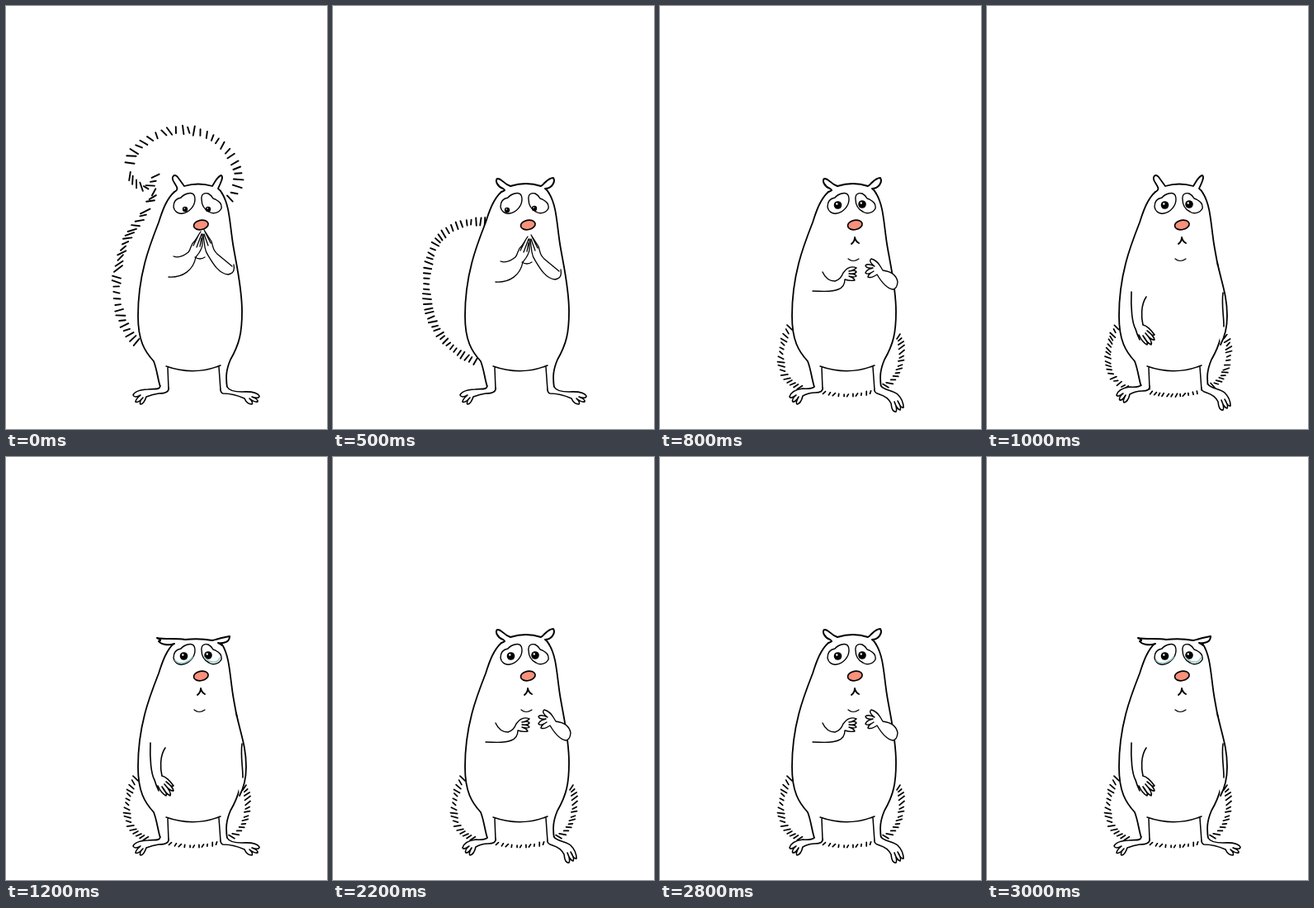
These frames come from a looping animation (389 px wide and 512 px high, 8 s). An HTML page:

```html
<!DOCTYPE html>
<html lang="en">
<head>
<meta charset="utf-8">
<title>Worried squirrel</title>
<style>
html, body { margin: 0; width: 100%; height: 100%; overflow: hidden; background: #fff; }
svg { display: block; width: 100%; height: 100%; }
svg * { stroke-linecap: round; stroke-linejoin: round; }
.pose { visibility: hidden; animation: 8s step-end infinite; }
.shy { animation-name: shy; }
.peek { animation-name: peek; }
.hide { animation-name: hide; }
.fidget { animation-name: fidget; }
.start { animation-name: start; }
.settle { animation-name: settle; }
.sad { animation-name: sad; }
@keyframes shy { 0% { visibility: visible } 6.25%, 100% { visibility: hidden } }
@keyframes peek { 0% { visibility: hidden } 6.25% { visibility: visible } 8.75%, 100% { visibility: hidden } }
@keyframes hide { 0%, 10%, 35%, 100% { visibility: hidden } 8.75%, 28.75% { visibility: visible } }
@keyframes fidget { 0%, 12.5%, 28.75%, 36.25%, 100% { visibility: hidden } 10%, 27.5%, 35% { visibility: visible } }
@keyframes start { 0%, 15%, 100% { visibility: hidden } 12.5% { visibility: visible } }
@keyframes settle { 0%, 37.5%, 100% { visibility: hidden } 36.25% { visibility: visible } }
@keyframes sad { 0%, 27.5% { visibility: hidden } 15%, 37.5%, 100% { visibility: visible } }
</style>
</head>
<body>
<svg viewBox="0 0 389 512" fill="none" stroke="#000" stroke-width="1.4">
<defs>
  <g id="body" stroke-width="1.8">
    <path fill="#fff" stroke="none" d="M204 225C195 233 190 246 185 262C174 290 160 325 160 375C160 405 168 418 179 430C183 440 184 452 187 461L197 464L196 438Q228 447 259 436L260 465L268 462C266 448 267 440 272 428C283 409 286 395 286 370C286 340 279 313 275 288C271 262 271 242 262 227Z"/>
    <path d="M204 225C195 233 190 246 185 262C174 290 160 325 160 375C160 405 168 418 179 430C183 440 184 452 187 461M268 462C266 448 267 440 272 428C283 409 286 395 286 370C286 340 279 313 275 288C271 262 271 242 262 227"/>
    <path stroke-width="1.5" d="M197 464L196 438M194 436Q228 448 260 435M258 437L260 465"/>
  </g>
  <ellipse id="nose" cx="236.300" cy="265" rx="8.900" ry="5.700" fill="#f9917b" stroke-width="1.7" transform="rotate(-11 236 265)"/>

  <path id="ears-up" fill="#fff" stroke-width="1.8" d="M204 225C210 222 207 219 204 214C199 207 204 202 208 207L216 218Q233 213 250 218C254 212 256 206 261 205C264 207 260 214 257 221Q260 223 262 227"/>
  <path id="ears-out" fill="#fff" stroke-width="2" d="M204 225C209 223 209 223 206 221C200 219 196 212 199 209C204 208 206 215 215 218Q234 212 252 218C257 215 260 208 267 208C270 213 265 221 257 221Q260 223 262 227"/>
  <path id="ears-flat" fill="#fff" stroke-width="2" d="M204 226C195 229 187 226 185 223Q190 222 183 219C192 221 206 219 217 221Q234 219 250 222C258 220 264 218 271 217C271 223 266 226 257 225Q260 226 262 228"/>

  <g id="eyes" fill="#fff">
    <path d="M229 234C229 226 224 226 220 227Q214 229 212 232C206 233 203 237 203 243C204 249 209 252 214 251C222 250 229 242 229 234Z"/>
    <path d="M237 234C236 227 241 226 245 227Q249 229 251 233C257 235 262 239 261 245C258 251 250 252 246 249C240 246 237 240 237 234Z"/>
  </g>
  <g id="pupil">
    <circle r="3.200" fill="#000" stroke="none"/>
    <circle cx="-.8" cy="-1" r=".8" fill="#fff" stroke="none"/>
  </g>
  <g id="stare">
    <use href="#eyes"/>
    <use href="#pupil" transform="translate(215.500 241) scale(1.5)"/>
    <use href="#pupil" transform="translate(245 240) scale(1.5)"/>
    <path stroke-width="1.9" d="M232 288Q236 285 236 280Q237 285 241 287"/>
    <path stroke-width="1.2" d="M228 306Q234 311 241 306"/>
  </g>
  <path id="tears" stroke="#8fc9c4" stroke-width="1.5" d="M205 246Q209 251 216 249Q223 247 226 242M241 243Q246 249 254 248Q258 247 259 243"/>

  <g id="pray" stroke-width="1.300">
    <path d="M203 303Q211 306 221 298C225 293 223 289 229 284L236 273M197 328C214 329 227 320 230 304C234 299 237 296 238 289L238 276M227 290L234 276M231 292L237 276M235 291L237 281"/>
    <path d="M240 271L249 285C251 292 251 296 257 301L274 315M239 277L241 292Q242 298 245 302C251 312 258 324 269 325Q278 324 276 313M241 273L248 287M240 276L245 290M229 304Q235 308 241 304"/>
  </g>
  <g id="wring" stroke-width="1.400">
    <path d="M197 322Q202 333 212 333Q219 331 222 323Q229 313 238 317Q235 320 229 321M229 321Q237 319 238 322Q236 325 229 324Q237 324 238 327Q235 329 229 327Q235 329 236 332Q230 333 224 331Q224 340 216 343C207 347 195 345 185 345"/>
    <path fill="#fff" stroke="none" d="M268 318Q286 321 288 335Q287 343 280 343Q270 339 262 326Z"/>
    <path d="M270 320Q286 322 288 334Q287 343 282 343C275 342 269 335 263 325Q256 330 252 328Q252 325 259 321Q251 326 249 323Q250 319 258 317Q250 318 249 314Q252 311 260 315Q252 309 256 306Q263 308 267 315L270 320"/>
  </g>
  <g id="down" stroke-width="1.6">
    <path d="M175 346C174 366 176 384 180 391Q182 398 185 404M193 352C186 362 187 378 189 386Q195 387 203 398Q201 400 194 393Q202 399 203 404Q199 405 192 396Q201 406 199 410Q194 408 189 399Q196 408 194 410Q188 407 184 398"/>
    <path fill="#fff" stroke="none" d="M279 310C284 334 291 350 291 375Q291 395 283 410Q279 380 276 330Z"/>
    <path stroke-width="1.8" d="M279 310C284 334 291 350 291 375Q291 395 283 410"/>
    <path d="M286 347C284 362 287 374 287 388"/>
  </g>

  <g id="feet-flat" fill="#fff" stroke-width="1.6">
    <path d="M187 460C186 465 180 463 172 464Q156 465 154 471Q156 475 163 471Q157 476 157 479Q160 481 166 474Q161 479 163 482Q167 482 170 473Q178 470 185 469Q198 469 197 462"/>
    <path d="M268 461C270 465 278 467 286 467Q304 466 307 472Q307 476 298 473Q306 476 305 479Q301 480 295 475Q300 480 298 482Q292 482 289 475C280 471 270 469 263 469Q260 468 260 464"/>
  </g>
  <g id="feet-in" fill="#fff" stroke-width="1.6">
    <path d="M187 461Q183 464 173 463Q159 465 157 473Q158 476 165 471Q159 476 161 479Q164 480 168 473Q164 480 166 482Q171 481 173 472Q180 468 188 468Q198 468 197 462"/>
    <path d="M268 460C271 465 282 465 288 470Q295 477 295 486Q292 487 288 478Q293 486 291 489Q287 488 284 479Q288 488 286 491Q281 492 280 481Q276 473 266 470Q259 468 260 464"/>
  </g>

  <path id="tail-up" stroke-width="1.900"/>
  <path id="tail-side" stroke-width="1.900"/>
  <path id="tail-low" stroke-width="1.7"/>
  <path id="tail-shake" stroke-width="1.7"/>
</defs>

<g class="pose shy">
  <use href="#tail-up"/><use href="#body"/><use href="#feet-flat"/><use href="#ears-up"/><use href="#eyes"/>
  <use href="#pupil" x="217" y="246"/><use href="#pupil" x="245" y="246"/>
  <use href="#nose"/><use href="#pray"/>
</g>
<g class="pose peek">
  <use href="#tail-side"/><use href="#body"/><use href="#feet-flat"/><use href="#ears-out"/><use href="#eyes"/>
  <use href="#pupil" x="211" y="247"/><use href="#pupil" x="244" y="245"/>
  <use href="#nose"/><use href="#pray" y="6"/>
</g>
<g class="pose hide">
  <use href="#tail-low"/><use href="#body"/><use href="#feet-flat"/><use href="#ears-out"/><use href="#eyes"/>
  <use href="#pupil" x="211" y="247"/><use href="#pupil" x="244" y="245"/>
  <use href="#nose"/><use href="#pray" y="6"/>
</g>
<g class="pose fidget">
  <use href="#tail-low"/><use href="#body"/><use href="#feet-in"/><use href="#ears-out"/><use href="#stare"/>
  <use href="#nose"/><use href="#wring"/>
</g>
<g class="pose start">
  <use href="#tail-shake"/><use href="#body"/><use href="#feet-in" y="-2"/><use href="#ears-up"/><use href="#stare"/>
  <use href="#nose"/><use href="#down"/>
</g>
<g class="pose settle">
  <use href="#tail-shake"/><use href="#body"/><use href="#feet-in" y="-2"/><use href="#ears-out"/><use href="#stare"/>
  <use href="#nose"/><use href="#down"/>
</g>
<g class="pose sad">
  <use href="#tail-low"/><use href="#body"/><use href="#feet-flat"/><use href="#ears-flat"/><use href="#stare"/><use href="#tears"/>
  <use href="#nose"/><use href="#down"/>
</g>
</svg>
<script>
function random(seed) {
  return () => (seed = (seed * 16807) % 2147483647) / 2147483647;
}

// Short strokes set across a guide curve, with uneven length and tilt.
function fur(guide, gap, size, lean, mess, rand) {
  const path = document.createElementNS("http://www.w3.org/2000/svg", "path");
  path.setAttribute("d", guide);
  const total = path.getTotalLength();
  let d = "";
  for (let at = 0; at <= total; at += gap * (0.8 + 0.4 * rand())) {
    const p = path.getPointAtLength(at);
    const a = path.getPointAtLength(Math.max(0, at - 1));
    const b = path.getPointAtLength(Math.min(total, at + 1));
    const angle = Math.atan2(b.y - a.y, b.x - a.x) + Math.PI / 2 + lean + (rand() - 0.5) * mess;
    const half = size * (0.7 + 0.6 * rand()) / 2;
    const dx = Math.cos(angle) * half, dy = Math.sin(angle) * half;
    d += `M${(p.x - dx).toFixed(1)} ${(p.y - dy).toFixed(1)}L${(p.x + dx).toFixed(1)} ${(p.y + dy).toFixed(1)}`;
  }
  return d;
}

function setTail(id, d) {
  document.getElementById(id).setAttribute("d", d);
}

function lowTail(seed) {
  const rand = random(seed);
  return fur("M157 389C147 405 143 430 150 445Q156 457 170 462", 5, 6.5, 0.45, 0.5, rand)
    + fur("M289 400C296 412 293 435 287 446Q280 458 270 461", 5, 6.5, -0.45, 0.5, rand)
    + fur("M199 468Q228 475 257 467", 5.5, 3.5, 0.4, 0.9, rand);
}

const rand = random(4217);
setTail("tail-up",
  fur("M158 407C139 389 132 358 134 328", 6.5, 9, 0.15, 0.5, rand)
  + fur("M136 318C140 292 149 274 161 261Q168 252 171 243", 6.5, 10, -0.8, 0.5, rand)
  + fur("M175 236Q180 230 179 222", 6, 8, -0.9, 0.5, rand)
  + fur("M150 206C156 216 166 222 173 219C178 215 180 209 182 203", 6.5, 9, -0.8, 0.5, rand)
  + fur("M150 190C150 168 190 150 210 150C250 148 274 175 281 200C284 215 278 228 269 235", 8, 9, -0.2, 0.6, rand));
setTail("tail-side",
  fur("M184 261C158 260 137 267 124 288C111 313 112 345 115 362C120 395 145 420 174 431", 5.6, 8, 0.1, 0.35, rand));
setTail("tail-low", lowTail(91));
setTail("tail-shake", lowTail(5023));
</script>
</body>
</html>
```
